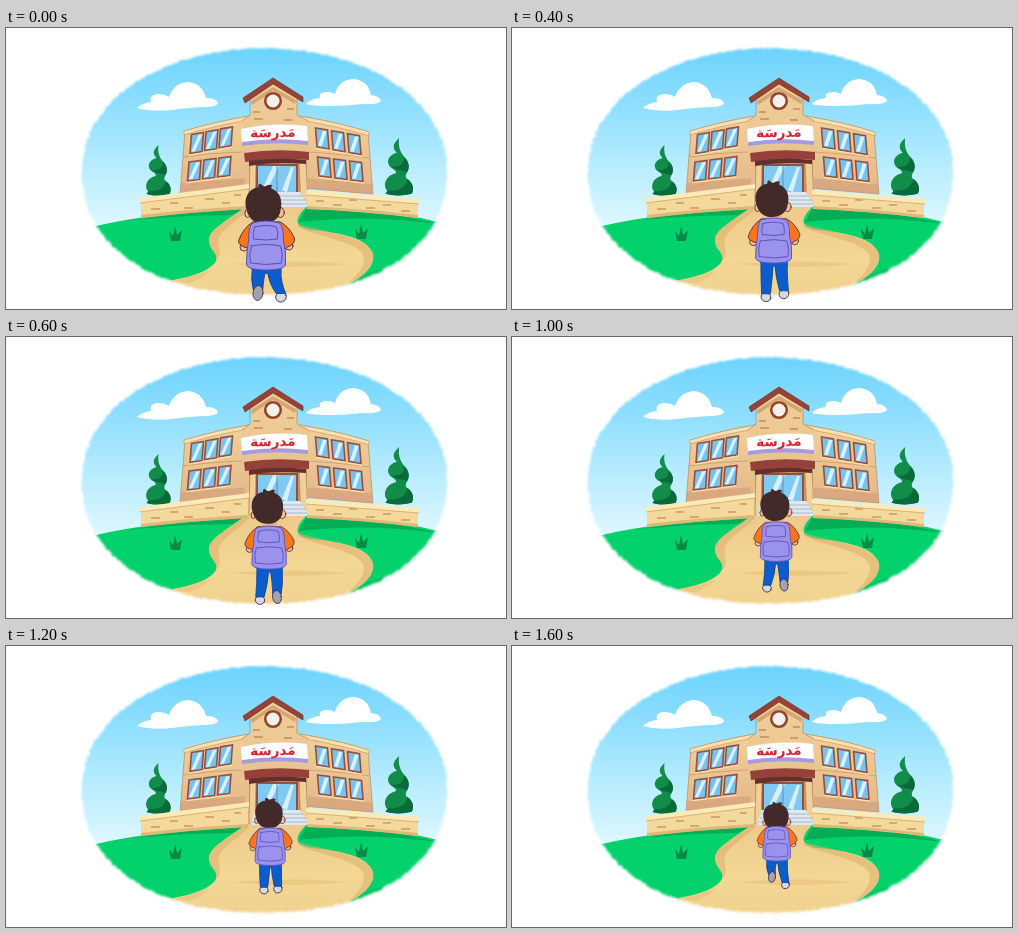
An HTML page for the animation above (1800 ms loop, 500x281 px).

```html
<!DOCTYPE html>
<html lang="ar">
<head>
<meta charset="utf-8">
<title>مدرسة</title>
<style>
html, body { margin: 0; width: 100%; height: 100%; overflow: hidden; background: #fff; }
svg { display: block; width: 100%; height: 100%; }
</style>
</head>
<body>
<svg viewBox="0 0 500 281" xmlns="http://www.w3.org/2000/svg">
  <defs>
    <filter id="soft"><feGaussianBlur stdDeviation=".9"/></filter>
    <mask id="oval" maskUnits="userSpaceOnUse" x="0" y="0" width="500" height="281">
      <path id="edge" fill="#fff" filter="url(#soft)"/>
    </mask>
    <linearGradient id="sky" x1="0" y1="0" x2="0" y2="1">
      <stop offset="0" stop-color="#68d2fd"/>
      <stop offset=".35" stop-color="#90dffe"/>
      <stop offset=".7" stop-color="#beeeff"/>
      <stop offset="1" stop-color="#e2f8ff"/>
    </linearGradient>
    <linearGradient id="wall" x1="0" y1="0" x2="0" y2="1">
      <stop offset="0" stop-color="#f0d09a"/>
      <stop offset="1" stop-color="#e3b888"/>
    </linearGradient>
    <linearGradient id="path" x1="0" y1="0" x2="0" y2="1">
      <stop offset="0" stop-color="#edc98b"/>
      <stop offset=".5" stop-color="#f3d794"/>
      <stop offset="1" stop-color="#f1d18f"/>
    </linearGradient>
  </defs>
  <g mask="url(#oval)">
    <rect x="70" y="14" width="380" height="190" fill="url(#sky)"/>

    <!-- clouds -->
    <g fill="#fff">
      <path d="M131 80Q136 75 145 74Q143 67 151 66Q159 66 163 69Q168 55 182 54Q196 55 200 70Q210 70 212 75Q211 79 198 79Q180 80 166 82Q146 84 131 80Z"/>
      <path d="M300 76Q304 71 314 70Q312 64 321 64Q326 64 329 66Q333 52 347 51Q362 52 365 67Q374 68 375 73Q371 77 356 76Q340 78 325 78Q308 78 300 76Z"/>
    </g>

    <!-- ground -->
    <path d="M70 203Q130 186 240 179H300Q390 180 445 198V275H70Z" fill="#03d16c"/>
    <path d="M120 193Q180 184 239 180L226 187Q180 187 120 193ZM300 181Q370 180 432 196Q360 186 293 194Z" fill="#05ad55"/>
    <path d="M352 250Q370 240 410 232L400 245Q375 258 340 260Z" fill="#05ad55" fill-opacity=".45"/>
    <path d="M242 177C224 191 203 201 203 212C203 222 213 225 210 233C204 244 180 251 152 254L160 278H352L340 257C358 249 369 238 367 226C362 211 338 205 306 202C288 199 287 192 302 177Z" fill="url(#path)"/>
    <g fill="#dcb06c" fill-opacity=".55">
      <path d="M239 180C224 191 203 201 203 212C203 222 213 225 210 233C218 226 211 219 213 211C215 201 236 190 244 180Z"/>
      <path d="M292 196C310 202 362 208 367 226C368 238 358 249 340 257C354 245 360 237 357 227C350 213 312 209 292 199Z"/>
      <path d="M155 255Q185 250 204 242Q200 249 184 255ZM225 236Q290 231 340 236Q290 242 225 236Z" fill-opacity=".35"/>
    </g>
    <g fill="#078a47">
      <path id="tuft" d="M165 213L163 203L167 208L169 198L171 207L176 202L174 213Z"/>
      <use href="#tuft" x="186" y="-2"/>
    </g>

    <!-- topiary -->
    <g id="trees"></g>

    <!-- wings -->
    <g fill="url(#wall)" stroke="#b57c55" stroke-width=".6">
      <path d="M179 103Q208 94 243 88V160L174 166Z"/>
      <path d="M294 88Q335 95 362 104L367 166L296 160Z"/>
    </g>
    <path d="M178 103Q208 94 243 88V92Q208 98 178 107ZM294 88Q335 95 363 104V108Q335 99 294 92Z" fill="#f8e0b0" stroke="#b9804f" stroke-width=".5"/>
    <path d="M177 129Q205 125 236 124M302 124Q335 126 364 130" fill="none" stroke="#d0a070" stroke-width="1.2"/>
    <path d="M175 155L242 150V160L174 166ZM298 150L366 156V166L298 160Z" fill="#cf9878" fill-opacity=".5"/>
    <g id="panes"></g>

    <!-- centre block -->
    <path d="M236 92L245 87V70L267 55L291 70V87L302 92V178H240Z" fill="url(#wall)"/>
    <path d="M244 70V87L236 93M291 70V87L302 93" fill="none" stroke="#b57c55" stroke-width=".6"/>
    <path d="M237 70L267 50L297 69V74L267 56L239 75Z" fill="#984136" stroke="#6b2a20" stroke-width=".6" stroke-linejoin="round"/>
    <path d="M245 73L267 59L290 72L289 76L267 63L246 77Z" fill="#c48d58" fill-opacity=".6"/>
    <circle cx="267" cy="73" r="7.8" fill="#f4f0ea" stroke="#94452f" stroke-width="2.6"/>
    <path d="M247 84h7M281 81h7M248 91h9M278 92h8" stroke="#c48d58" stroke-width="1.4"/>

    <!-- entrance -->
    <path d="M243 132H301V178H244Z" fill="#cb9566"/>
    <path d="M250 136H292V165H250Z" fill="#8f5140"/>
    <path d="M252 138H290V166H252Z" fill="#7fc9f2"/>
    <path d="M255 164L267 138H273L260 164ZM276 162L285 139H288L281 164Z" fill="#d5f0fb"/>
    <path d="M271 138V165" stroke="#5d8eae" stroke-width="1"/>
    <path d="M244 134H250L249 178H243ZM293 134H300L302 178H295Z" fill="#f0cf98" stroke="#b57c55" stroke-width=".6"/>
    <path d="M249 164H294L303 179H245Z" fill="#dfe8f0"/>
    <path d="M249 168H297M248 172H300M246 176H302" stroke="#a9b9cb" stroke-width="1.2"/>
    <path d="M238 125Q270 120 303 124V132Q270 129 239 134Z" fill="#95403a"/>
    <path d="M243 133Q270 129 300 132V136Q270 133 243 138Z" fill="#642e2c"/>
    <path d="M236 117Q270 113 302 117V123Q270 118 237 124Z" fill="#e7c58f"/>
    <path d="M235 101Q268 94 301 98L302 116Q268 112 236 117Z" fill="#fff"/>
    <path d="M236 114Q268 109 302 113V117Q268 113 236 118Z" fill="#a79ae0"/>
    <text x="267" y="109" transform="rotate(-1 267 107)" text-anchor="middle" font-family="'DejaVu Sans', 'Noto Sans', sans-serif" font-weight="700" font-size="13.5" fill="#d2232f">مَدرسَة</text>

    <!-- low walls -->
    <g fill="#f4d99c">
      <path d="M135 171L242 158V181Q185 184 135 190Z"/>
      <path d="M301 164L412 173V190Q355 183 301 181Z"/>
    </g>
    <path d="M134 170L243 156V161L134 175ZM300 162L413 171V176L300 167Z" fill="#fbe9b8"/>
    <path d="M134 175L243 161M300 167L413 176" stroke="#d2a468" stroke-width=".8"/>
    <path d="M145 181h9M164 175h8M178 180h9M199 171h9M216 175h8M228 167h7M310 173h8M327 177h9M343 172h8M360 180h9M377 177h8M395 183h9M184 157h8M206 154h8M322 154h8M345 157h8" stroke="#d6a870" stroke-width="1.8"/>
    <path d="M135 187Q185 181 242 178V181Q185 184 135 190ZM301 178Q360 181 412 187V190Q360 183 301 181Z" fill="#c99559" fill-opacity=".5"/>
  </g>

  <g id="boy" stroke="#3a2a45" stroke-linejoin="round" stroke-linecap="round">
    <g id="legs"></g>
    <g id="body" stroke-width=".9">
      <ellipse cx="-22.5" cy="1" rx="4" ry="4" fill="#ffba90"/>
      <ellipse cx="22.5" cy="0" rx="4" ry="4" fill="#ffba90"/>
      <path d="M-14 -24Q-24 -17 -28 -5Q-28 0 -19 2L-14 5H16L21 1Q29 -2 28 -8Q23 -19 14 -24Z" fill="#fd7519"/>
      <path d="M-14 22H15V28H-14Z" fill="#0b5dcd" stroke="none"/>
    </g>
    <g id="head" stroke-width=".9">
      <path d="M-6 11H11V20H-6Z" fill="#f2ab82" stroke="none"/>
      <ellipse cx="-16" cy="8" rx="2.6" ry="4" fill="#ffba90"/>
      <ellipse cx="17" cy="7" rx="3.8" ry="5" fill="#ffba90"/>
      <path d="M-17 4C-21 -10 -12 -18 -5 -18Q-6 -21 -3 -22Q-2 -20 1 -19Q6 -22 9 -20Q7 -19 8 -17C18 -13 19 -3 17 5C16 13 9 18 0 18C-9 18 -15 13 -17 4Z" fill="#432a2a" stroke="none"/>
    </g>
    <g id="bag" stroke="#5a50b4" stroke-width="1" fill="#9a92ec">
      <path d="M-14 -23Q0 -27 13 -23Q17 -20 17 -5Q20 5 19 19Q17 24 0 24Q-18 24 -20 19Q-20 5 -18 -5Q-18 -20 -14 -23Z"/>
      <path d="M-12 -19Q0 -22 10 -19Q12 -13 11 -7Q0 -5 -13 -7Q-14 -14 -12 -19Z"/>
      <path d="M-15 0Q0 -3 14 0Q17 8 15 17Q0 20 -16 17Q-18 8 -15 0Z"/>
    </g>
  </g>
</svg>
<script>
const $ = id => document.getElementById(id);

// Seeded noise for the brushed outline
let seed = 7;
const rand = () => (seed = seed * 16807 % 2147483647) / 2147483647;

function ovalPath() {
  const bend = (v, r, p) => r * Math.sign(v) * Math.abs(v) ** p;
  const pts = [];
  for (let i = 0; i < 700; i++) {
    const a = i / 700 * 2 * Math.PI;
    const k = 1 - rand() * 0.014;
    const p = Math.sin(a) > 0 ? 0.91 : 0.97; // fuller below
    pts.push((258.5 + bend(Math.cos(a), 184, p) * k).toFixed(1) + ' ' +
             (143.5 + bend(Math.sin(a), 124, p) * k).toFixed(1));
  }
  return 'M' + pts.join('L') + 'Z';
}

function pane(x, y, slope, lean) {
  const w = 12, h = 19;
  const at = (u, v) => (x + u * w + v * lean) + ' ' + (y + v * h + u * slope);
  const quad = (...p) => 'M' + p.map(q => at(...q)).join('L') + 'Z';
  return `<path d="${quad([0, 0], [1, 0], [1, 1], [0, 1])}" fill="#74c4f2" stroke="#9a4f3e" stroke-width="1.6"/>
    <path d="${quad([.6, .08], [.92, .08], [.4, .92], [.1, .92])}" fill="#d8f1fd"/>
    <path d="M${at(-.1, 1.08)}L${at(1.1, 1.08)}" stroke="#f8e2b6" stroke-width="1.3"/>`;
}

const tree = (x, y, s) => `<g transform="translate(${x} ${y}) scale(${s})">
  <path d="M1 0C-6 6 -4 10 -1 13C-9 15 -11 22 -6 26C-3 28 -1 29 -2 31C-11 33 -14 42 -9 47L-11 49Q0 52 12 49C15 44 12 38 8 36C6 34 7 32 8 30C11 25 9 19 5 16C2 12 0 8 1 0Z" fill="#118d49"/>
  <path d="M5 17C6 23 0 26 -6 25C-2 29 4 28 8 30C11 25 9 20 5 17ZM8 36C8 43 0 47 -9 46L-11 49Q0 52 12 49C15 44 12 38 8 36Z" fill="#0a6b3a"/>
</g>`;

$('edge').setAttribute('d', ovalPath());
$('trees').innerHTML = tree(151.5, 117, 1) + tree(392, 110, 1.14);

let panes = '';
for (let i = 0; i < 3; i++) {
  panes += pane(185.5 + i * 14.5, 106.5 - i * 2.8, -2, -1.5) + pane(183 + i * 15, 134 - i * 2, -1.5, -1.5) +
           pane(309.5 + i * 16, 100 + i * 2.8, 2, 1.5) + pane(311.5 + i * 16, 129 + i * 2, 1.5, 1.5);
}
$('panes').innerHTML = panes;

// Each pose: head x, y, scale, bag x, y, left foot x, y, right foot x, y
const poses = [
  [257.5, 177.5, 1, 260.5, 218, 252, 265, 275, 269],
  [258.5, 176.5, .96, 261, 216, 252, 267, 274, 268],
  [260, 172.5, .92, 262, 213, 254, 269, 272, 266],
  [261.5, 171, .88, 263.5, 211, 254, 263, 271, 260],
  [263, 170.5, .86, 265.5, 209, 252, 258, 271, 254],
  [263, 169.5, .81, 264.5, 205, 255, 251, 272, 248],
  [263, 168.5, .77, 264.5, 201, 258, 244, 272, 243],
  [263.5, 171.5, .74, 265, 199.5, 259, 236, 273, 239.5],
  [264, 171, .71, 265, 198, 260, 231, 273.5, 239]
];
const STEP = 200;

function leg(side, s, bx, by, x, y, lift) {
  const hx = bx + side * 7.5 * s, hy = by + 23 * s;
  const kx = hx + side * (lift ? 2 : 0.5) * s, ky = (hy + y) / 2;
  const end = y - 3.5 * s, hip = 6.8 * s, knee = 6.2 * s, hem = 4.8 * s;
  const trousers = `<path fill="#0b5dcd" stroke="#143c8c" stroke-width=".8"
    d="M${hx - hip} ${hy}H${hx + hip}Q${kx + knee} ${ky} ${x + hem} ${end}H${x - hem}Q${kx - knee} ${ky} ${hx - hip} ${hy}Z"/>`;
  const [rx, ry, fill] = lift ? [5, 7.5, '#a3a2ae'] : [5.4, 5, '#d8d8e2'];
  const shoe = `<ellipse cx="${x}" cy="${y}" rx="${rx * s}" ry="${ry * s}" fill="${fill}"
    stroke-width=".8" transform="rotate(${side * (lift ? -8 : -20)} ${x} ${y})"/>`;
  return lift ? trousers + shoe : shoe + trousers;
}

function draw(ms) {
  const i = Math.floor(ms / STEP) % poses.length;
  const [hx, hy, s, bx, by, lx, ly, rx, ry] = poses[i];
  const place = (id, x, y) => $(id).setAttribute('transform', `translate(${x} ${y}) scale(${s})`);
  place('head', hx, hy);
  place('body', bx, by);
  place('bag', bx, by);
  // The feet take turns lifting, one full stride every eight poses
  const swing = Math.cos(i * Math.PI / 4);
  $('legs').innerHTML = leg(-1, s, bx, by, lx, ly, swing > .5) + leg(1, s, bx, by, rx, ry, swing < -.5);
}

const start = performance.now();
function tick() {
  draw(performance.now() - start);
  requestAnimationFrame(tick);
}
draw(0);
requestAnimationFrame(tick);
</script>
</body>
</html>
```
